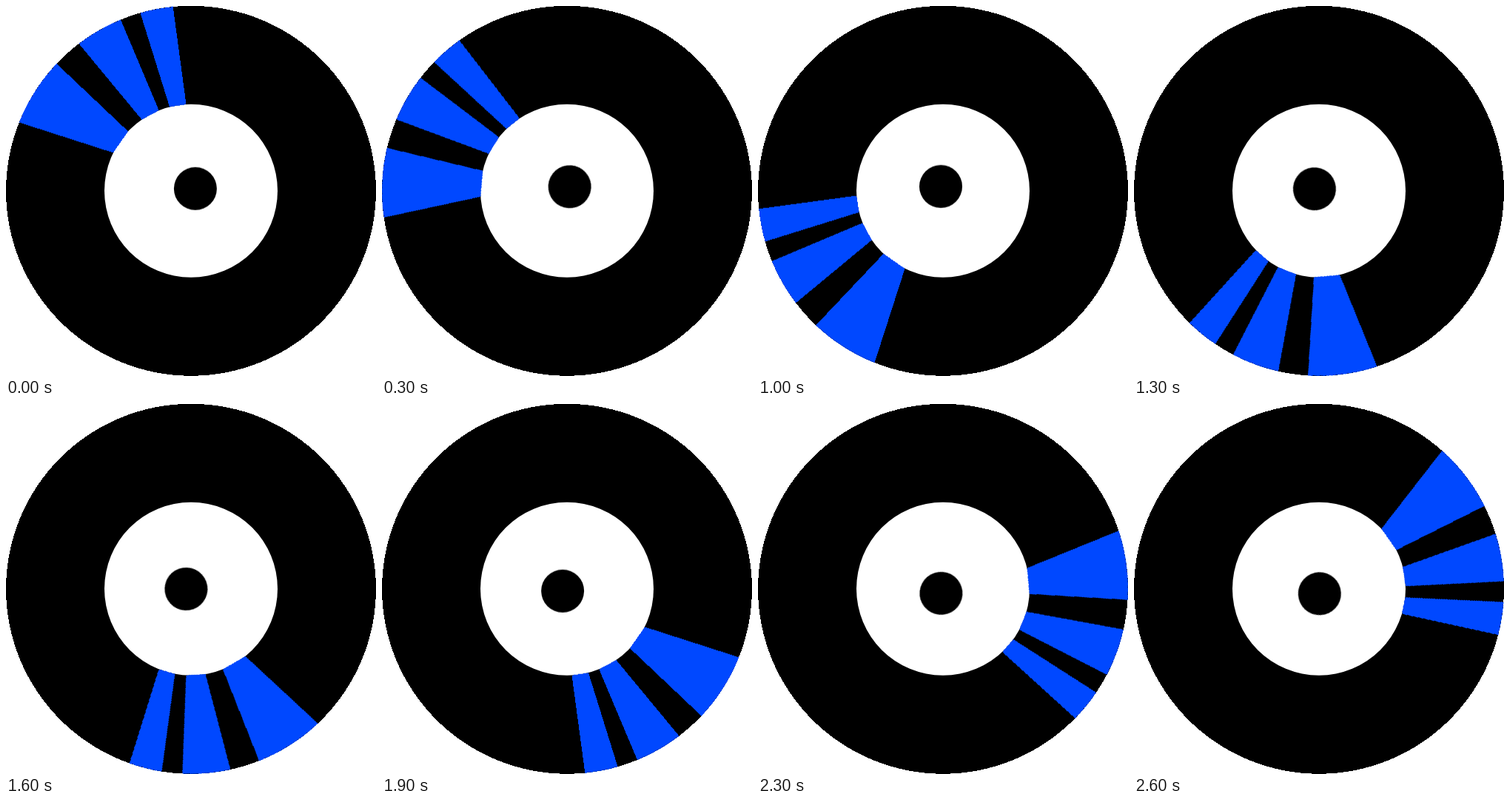
Recreate the animation shown at these times as an HTML page. Size 500 by 500 pixels, loop 2.7 s.

```html
<!DOCTYPE html>
<html lang="en">
<head>
<meta charset="utf-8">
<title>Spinning record</title>
<style>
  html, body { margin: 0; width: 100%; height: 100%; overflow: hidden; background: #fff; }
  svg { display: block; width: 100vw; height: 100vh; }
  #disc, #rays { shape-rendering: crispEdges; }
</style>
</head>
<body>
<svg viewBox="0 0 500 500">
  <g transform="translate(250 249.75)">
    <circle id="disc" r="250"/>
    <circle r="117" fill="#fff"/>
    <g id="spin">
      <path id="rays" fill="#0048ff"/>
      <circle cx="5.9" cy="-2.95" r="29"/>
    </g>
  </g>
</svg>
<script>
  const DISC = 250, LABEL = 117, STEP = 100, STEPS = 27;

  const at = (r, deg) => {
    const a = deg * Math.PI / 180;
    return `${(r * Math.cos(a)).toFixed(2)} ${(r * Math.sin(a)).toFixed(2)}`;
  };

  // Each ray and gap is 0.69 times as wide as the one before; inner ends lean clockwise.
  let path = '', start = 201.7;
  for (let i = 0; i < 3; i++) {
    const scale = 0.69 ** i;
    const end = start + 21.7 * scale;
    path += `M${at(LABEL, start + 4.4 * 0.6 ** i)}L${at(DISC, start)}` +
      `A${DISC} ${DISC} 0 0 1 ${at(DISC, end)}L${at(LABEL, end + 0.6 * i * i)}Z`;
    start = end + 9.3 * scale;
  }
  document.getElementById('rays').setAttribute('d', path);

  // Counterclockwise turn, about 10 degrees a step: [step, degrees]
  const turns = [[0, 0], [6, 60], [10, 90], [13, 130], [19, 180], [26, 250], [STEPS, 250]];

  const keys = turns.map(([step, deg], i) => ({
    offset: step / STEPS,
    transform: `rotate(${-deg}deg)`,
    easing: `steps(${(turns[i + 1]?.[0] ?? STEPS + 1) - step}, end)`
  }));

  document.getElementById('spin').animate(keys, { duration: STEPS * STEP, iterations: Infinity });
</script>
</body>
</html>
```
